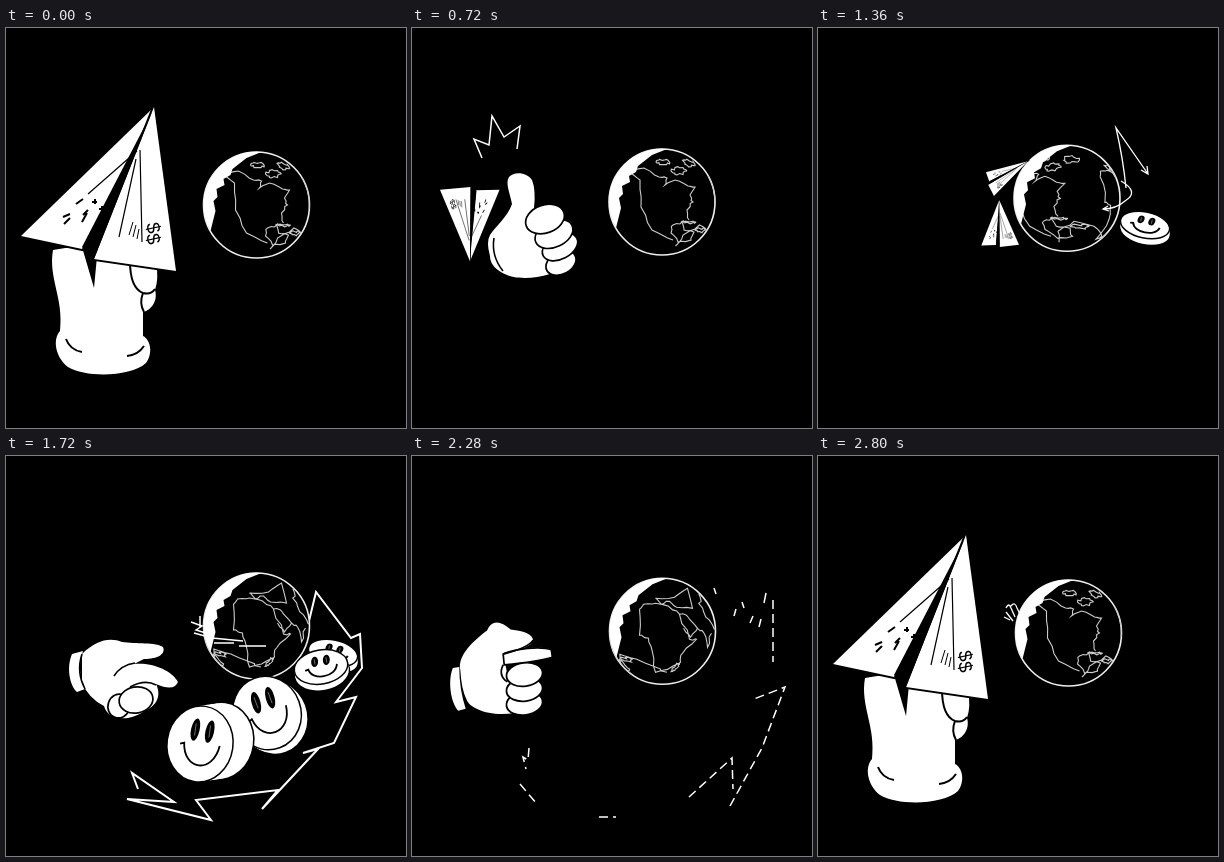
Animation of 400 by 400 pixels, one loop 3 s. Source, as an HTML page with a canvas:

```html
<!DOCTYPE html>
<html lang="en">
<head>
<meta charset="utf-8">
<title>Paper plane and coins</title>
<style>
html, body { margin: 0; width: 100%; height: 100%; overflow: hidden; background: #000; }
canvas { display: block; width: 400px; height: 400px; }
</style>
</head>
<body>
<canvas id="stage" width="400" height="400"></canvas>
<script>
const ctx = document.getElementById('stage').getContext('2d');
const LOOP = 3000, STEP = 40, R = 53, TURN = 2 * Math.PI;
const rad = d => d * Math.PI / 180;
const within = (t, a, b) => t >= a && t < b;

// Linear interpolation over rows of [time, ...values].
function keyed(rows, t) {
  let i = 0;
  while (i < rows.length - 2 && t >= rows[i + 1][0]) i++;
  const a = rows[i], b = rows[i + 1];
  const k = Math.min(1, Math.max(0, (t - a[0]) / (b[0] - a[0])));
  return a.slice(1).map((v, j) => v + (b[j + 1] - v) * k);
}
const ramp = (t, t0, t1, a, b) => keyed([[t0, a], [t1, b]], t)[0];

function fill(d, color = '#fff') {
  ctx.fillStyle = color;
  ctx.fill(new Path2D(d));
}

function stroke(d, width = 1.6, color = '#000') {
  ctx.strokeStyle = color;
  ctx.lineWidth = width;
  ctx.stroke(new Path2D(d));
}
const white = (d, w = 1.5) => stroke(d, w, '#fff');

function scaled(cx, cy, k, draw, dx = 0, dy = 0) {
  if (k <= 0.02) return;
  ctx.save();
  ctx.translate(cx + dx, cy + dy);
  ctx.scale(k, k);
  ctx.translate(-cx, -cy);
  draw();
  ctx.restore();
}

// ---- Globe: coasts are drawn flat at their facing angle, then lifted onto the sphere.
let seed = 7;
const noise = () => (seed = seed * 16807 % 2147483647) / 2147483647 - .5;
const coasts = [];

// Splits each leg of a coast in three and roughens the new points.
function coast(face, pts) {
  const out = [];
  for (let i = 0; i < pts.length - 2; i += 2) {
    for (const k of [0, .33, .67]) {
      const rough = k ? 2.4 : 0;
      out.push([pts[i] + (pts[i + 2] - pts[i]) * k + noise() * rough,
                pts[i + 1] + (pts[i + 3] - pts[i + 1]) * k + noise() * rough]);
    }
  }
  out.push(pts.slice(-2));
  coasts.push({ face, pts: out });
}

function island(face, x, y, rx, ry, tilt = 0, n = 6) {
  const pts = [];
  for (let i = 0; i <= n; i++) {
    const a = i / n * TURN, px = rx * Math.cos(a), py = ry * Math.sin(a);
    pts.push(x + px * Math.cos(tilt) - py * Math.sin(tilt), y + px * Math.sin(tilt) + py * Math.cos(tilt));
  }
  coast(face, pts);
}

coast(0, [-38, -25, -33, -30, -22, -22, -21, 5, -10, 28, 11, 38]);
coast(0, [-33, -30, -18, -34, -3, -25, 5, -24, 3, -17, 13, -22, 26, -16, 33, -15, 28, -7, 31, 0, 25, 8, 27, 18]);
coast(0, [20, 20, 11, 23, 9, 31, 16, 40, 29, 38, 32, 30, 22, 28, 20, 20]);
island(0, 38, 28, 5, 2);
island(0, 1, -40, 7, 3);
island(0, 17, -31, 8, 4);
island(0, 27, -39, 7, 3, .4);
coast(.75, [-8, 44, -9, 33, 7, 23, 27, 28, 34, 35, 33, 41]);
island(.75, -8, 20, 9, 1);
coast(2, [-23, -22, -19, -27, -7, -28, 6, -25, 17, -17, 27, 8, 34, 8, 20, 22, 18, 31, 10, 35, -7, 41, -10, 21, -14, 7, -23, 4, -23, -22]);
coast(2, [17, -17, 25, -15, 35, -3, 28, 6, 21, -3]);
coast(2, [35, -3, 41, 1, 45, 16, 49, 2]);
coast(2, [-7, -33, 12, -34, 25, -43, 30, -23, 14, -24, 7, -30, -1, -27, -7, -33]);
island(2, 13, 36, 6, 2, -.8);
island(3.7, 0, -18, 34, 20, .1, 9);
island(3.9, 20, 30, 12, 8);

const spin = [[1220, 0], [1360, .75], [1600, 1.95], [1680, 2], [2340, 2], [2480, 3], [2640, 5.4], [2760, TURN]];
const bob = [[0, 250.5, 177], [720, 250, 174], [1360, 249, 170.3], [1720, 250.5, 170], [2040, 250.5, 174.5], [2800, 250.5, 177]];

function globe(t) {
  const [x, y] = keyed(bob, t), [turn] = keyed(spin, t);
  ctx.save();
  ctx.translate(x, y);
  ctx.beginPath();
  ctx.arc(0, 0, R, 0, TURN);
  ctx.fillStyle = '#000';
  ctx.fill();
  ctx.strokeStyle = '#eee';
  ctx.lineWidth = 1.6;
  ctx.stroke();
  ctx.beginPath();
  for (const { face, pts } of coasts) {
    const c = Math.cos(turn - face), s = Math.sin(turn - face);
    let pen = false;
    for (const [px, py] of pts) {
      const z = Math.sqrt(Math.max(0, R * R - px * px - py * py));
      const seen = z * c + px * s >= 0;
      if (seen) ctx[pen ? 'lineTo' : 'moveTo'](px * c - z * s, py);
      pen = seen;
    }
  }
  ctx.strokeStyle = '#ccc';
  ctx.lineWidth = 1.1;
  ctx.stroke();
  fill('M-46 26A53 53 0 0 1 5-53L-10-47L-24-36L-26-30L-33-26L-32-20L-40-16L-39-8L-43-4L-41 6Z');
  ctx.restore();
}

// ---- Paper plane: x, y, length, heading, perspective
const REST = [92, 225, 156, 21, 1];
const flight = [
  [120, ...REST],
  [200, 88, 230, 152, 19, 1],
  [320, 120, 165, 120, 24, .6],
  [400, 132, 112, 92, -10, .2],
  [500, 112, 84, 72, -80, 0],
  [600, 74, 104, 68, -145, 0],
  [720, 58, 162, 71, -180, 0],
  [840, 64, 232, 62, -208, 0],
  [960, 98, 288, 56, -262, 0],
  [1100, 160, 282, 48, -318, 0],
  [1240, 182, 217, 45, -361, 0],
  [1360, 172, 156, 44, -301, -1.5],
  [1440, 206, 142, 16, -295, -1.5]
];
const regrow = [[2440, 98, 240, 40, 21, 1], [2640, ...REST]];

function basis([x, y, len, head, depth]) {
  const half = len * (.42 + .09 * depth), a = rad(head), b = rad(head - 8.3 * depth);
  return new DOMMatrix([half * Math.cos(b), half * Math.sin(b), len * Math.sin(a), -len * Math.cos(a), x, y]);
}
const home = basis(REST).inverse();

function plane(pose) {
  const m = basis(pose).multiply(home);
  ctx.save();
  ctx.transform(m.a, m.b, m.c, m.d, m.e, m.f);
  fill('M76 219L88 260L91 228Z', '#000');
  for (const wing of ['M148 79L15 208L76 221L133 112Z', 'M148 79L88 231L170 243Z']) {
    stroke(wing, 4);
    fill(wing);
  }
  fill('M146 84L132 111L76 219L88 231Z', '#000');
  stroke('M131 123L82 166M134 122L136 214M130 131L113 209', 1.2);
  stroke('M70 176l7-5M86 174h5m-2-3v5M93 181h5m-2-3v5M57 189l7-3M77 187l5-5M58 196l6-6M76 194l5-9', 2);
  stroke('M123 207l4-13m0 15l3-12m1 14l2-10', 1);
  ctx.fillStyle = '#000';
  ctx.font = '19px "Liberation Sans", Arial, sans-serif';
  ctx.textAlign = 'center';
  for (const y of [200, 211]) {
    ctx.save();
    ctx.translate(147, y);
    ctx.rotate(rad(78));
    ctx.fillText('$', 0, 6);
    ctx.restore();
  }
  ctx.restore();
}

function planes(t) {
  if (t < 1440) plane(keyed(flight, t));
  const late = t - 120;
  if (within(late, 1000, 1440)) plane(keyed(flight, late));
  if (t >= 2440) plane(keyed(regrow, t));
}

// ---- Hands
function finger(x, y, rx, ry, tilt) {
  ctx.beginPath();
  ctx.ellipse(x, y, rx, ry, rad(tilt), 0, TURN);
  ctx.fillStyle = '#fff';
  ctx.fill();
  ctx.strokeStyle = '#000';
  ctx.lineWidth = 1.7;
  ctx.stroke();
}

function holdHand() {
  fill('M47 222C42 250 58 270 54 303C46 312 50 330 62 339C80 350 125 349 140 335C147 326 145 312 137 308Q137 296 137 284C146 282 152 272 149 262Q153 250 150 236L90 215Z');
  stroke('M124 233Q124 260 137 265Q145 267 149 261M137 265Q133 275 138 284M60 311Q64 322 76 324M121 328Q132 327 138 318', 2);
}

function thumbHand() {
  fill('M78 207C84 198 96 188 100 176C98 165 93 155 97 149C102 143 115 144 120 152Q124 162 122 180L140 200L138 246C120 252 100 250 95 247Q78 240 78 228Q74 214 78 207Z');
  finger(149, 235, 16, 11, -28);
  finger(148, 219, 19, 12, -28);
  finger(142, 206, 20, 13, -25);
  finger(133, 191, 20, 14, -20);
  stroke('M82 210Q79 228 91 243');
}

function pointHand() {
  fill('M66 198C60 212 64 230 71 236L79 233Q70 214 77 195Z');
  fill('M76 198C90 184 104 181 116 186C130 188 150 186 157 191C160 198 152 203 138 203L128 208C145 206 166 214 172 226Q168 236 150 228C156 240 150 250 140 254Q132 260 122 262Q102 264 98 250Q82 242 76 226Z');
  finger(113, 250, 11, 12, 20);
  finger(130, 244, 17, 13, -10);
  stroke('M129 207Q115 209 108 220M150 229Q139 223 124 231M76 198Q70 216 79 233');
}

function gripHand() {
  fill('M50 220C45 232 48 252 55 260L62 258Q56 240 56 219Z');
  fill('M57 222C54 208 70 194 82 185C86 175 94 175 104 184Q124 186 125 194Q123 202 97 206L108 262C85 266 66 258 63 250Q58 240 57 222Z');
  for (const y of [253, 240, 226]) finger(117, y, 17, 11, -8);
  const edge = 'M97 207C108 202 132 199 142 203L143 210Q130 214 98 217Z';
  fill(edge);
  stroke(edge);
  stroke('M97 217Q92 227 101 233M125 194Q121 201 97 207');
}

const catching = [[1800, 6, 6, 1], [1920, 0, 0, 1], [2040, 0, 0, 1], [2200, -6, -8, 1.07], [2360, -6, -8, 1.07], [2440, 0, 10, .85]];

function hands(t) {
  if (t < 440) {
    const k = ramp(t, 200, 440, 1, .78);
    scaled(98, 285, k, holdHand, 0, within(t, 120, 200) ? 3 : (k - 1) * 220);
  } else if (t < 1240) {
    const k = keyed([[440, .8], [560, 1.12], [640, 1], [1120, 1], [1240, 0]], t)[0];
    scaled(118, 205, k, thumbHand);
  } else if (within(t, 1480, 1800)) {
    scaled(110, 220, ramp(t, 1480, 1640, 0, 1), pointHand);
  } else if (within(t, 1800, 2440)) {
    const [dx, dy, k] = keyed(catching, t);
    scaled(95, 220, k, gripHand, dx, dy);
  } else if (t >= 2440) {
    scaled(98, 285, ramp(t, 2440, 2640, .75, 1), holdHand);
  }
}

// ---- Coins: age, x, y, rx, ry, tilt, rim offset x and y
const toss = [
  [0, 304, 165, 8, 5, 40, 0, 1],
  [60, 327, 197, 25, 13, 12, 0, 6],
  [140, 315, 211, 27, 17, -10, 1, 6],
  [280, 261, 257, 34, 37, -20, 6, 4],
  [380, 205, 287, 33, 38, 0, 5, 2],
  [420, 194, 288, 33, 38, 8, 20, -3],
  [460, 158, 267, 32, 17, -18, 1, 8],
  [540, 120, 212, 22, 5, -8, 0, 5]
];

function coin(age) {
  const [x, y, rx, ry, tilt, ox, oy] = keyed(toss, age);
  // Builds a path in the tilted unit disc, leaving the pen unscaled.
  const trace = (draw, k = 0) => {
    ctx.beginPath();
    ctx.save();
    ctx.translate(x + ox * k, y + oy * k);
    ctx.rotate(rad(tilt));
    ctx.scale(rx, ry);
    draw();
    ctx.restore();
  };
  const ink = (color, width) => {
    ctx.strokeStyle = color;
    ctx.lineWidth = width;
    ctx.stroke();
  };
  const disc = () => ctx.arc(0, 0, 1, 0, TURN);
  for (let k = 1; k >= 0; k -= .25) {
    trace(disc, k);
    if (k === 1) ink('#000', 3);
    ctx.fillStyle = '#fff';
    ctx.fill();
  }
  ink('#000', 1.5);
  for (const side of [-.2, .24]) {
    trace(() => ctx.ellipse(side, -.36, .13, .3, .1, 0, TURN));
    ctx.fillStyle = '#000';
    ctx.fill();
    trace(() => { ctx.moveTo(side, -.52); ctx.lineTo(side, -.2); });
    ink('#888', .8);
  }
  trace(() => {
    ctx.moveTo(-.6, .06);
    ctx.lineTo(-.48, .02);
    ctx.bezierCurveTo(-.4, .75, .5, .75, .6, -.02);
  });
  ink('#000', 1.8);
}

function coins(t) {
  for (const born of [1660, 1580, 1440, 1300]) {
    if (within(t - born, 0, 540)) coin(t - born);
  }
}

// ---- Bolt, sparks and speed lines
const BOLT = 'M303 165L310 136L345 182L354 178L356 212L330 246L350 241L328 287L297 297L312 293L256 353L272 334L190 344L205 364L121 343L168 346L126 317L132 333';

function bolt(t) {
  if (!within(t, 1440, 1880)) return;
  const head = ramp(t, 1440, 1640, 60, 780), tail = ramp(t, 1760, 1880, 0, 780);
  ctx.save();
  ctx.setLineDash([0, tail, head - tail, 2000]);
  white(BOLT, 2);
  ctx.restore();
}

function accents(t) {
  if (within(t, 640, 840)) {
    scaled(88, 125, ramp(t, 640, 720, .6, 1), () => white('M70 130L62 111L77 117L80 88L92 109L108 98L105 121'));
  }
  if (within(t, 1280, 1440)) {
    white('M308 160Q305 130 298 100L330 146m-7-4l7 4l-1-8M303 153Q322 164 307 173Q298 181 285 181m5-3l-5 3l6 2', 1.3);
  }
  if (within(t, 1640, 1800)) {
    white('M185 166l11 4l-6 4l13 4M188 177L206 182L237 185M194 171v-11M208 187h20M233 190h27');
  }
  if (within(t, 1960, 2120)) {
    white('M124 165L137 143l-8 13M146 166l7-12l-3 11L168 141M168 185L196 179m-24 4l10-2M162 205L178 211l-8-6');
  }
  if (within(t, 2160, 2340)) {
    ctx.save();
    ctx.setLineDash([9, 5]);
    white('M318 350L350 292L373 231L342 243M277 341L320 302L321 333M108 328L124 347M117 292l-1 12l-5-3l3 12M361 144V206M187 361h17');
    ctx.setLineDash([]);
    white('M302 132l2 6M322 160l2-7M330 146l2 6M338 167l3-7M347 171l2-8M352 147l2-10');
    ctx.restore();
  }
  if (t >= 2600) {
    white('M188 152q3-6 5 0l4 9M193 150q4-5 6 2l3 6M188 156l7 9M186 161l6 3', 1.3);
  }
}

function frame(now) {
  const t = Math.floor(now % LOOP / STEP) * STEP;
  ctx.fillStyle = '#000';
  ctx.fillRect(0, 0, 400, 400);
  for (const layer of [bolt, globe, accents, hands, planes, coins]) layer(t);
}

const start = performance.now();
function tick() {
  frame(performance.now() - start);
  requestAnimationFrame(tick);
}
tick();
</script>
</body>
</html>
```
